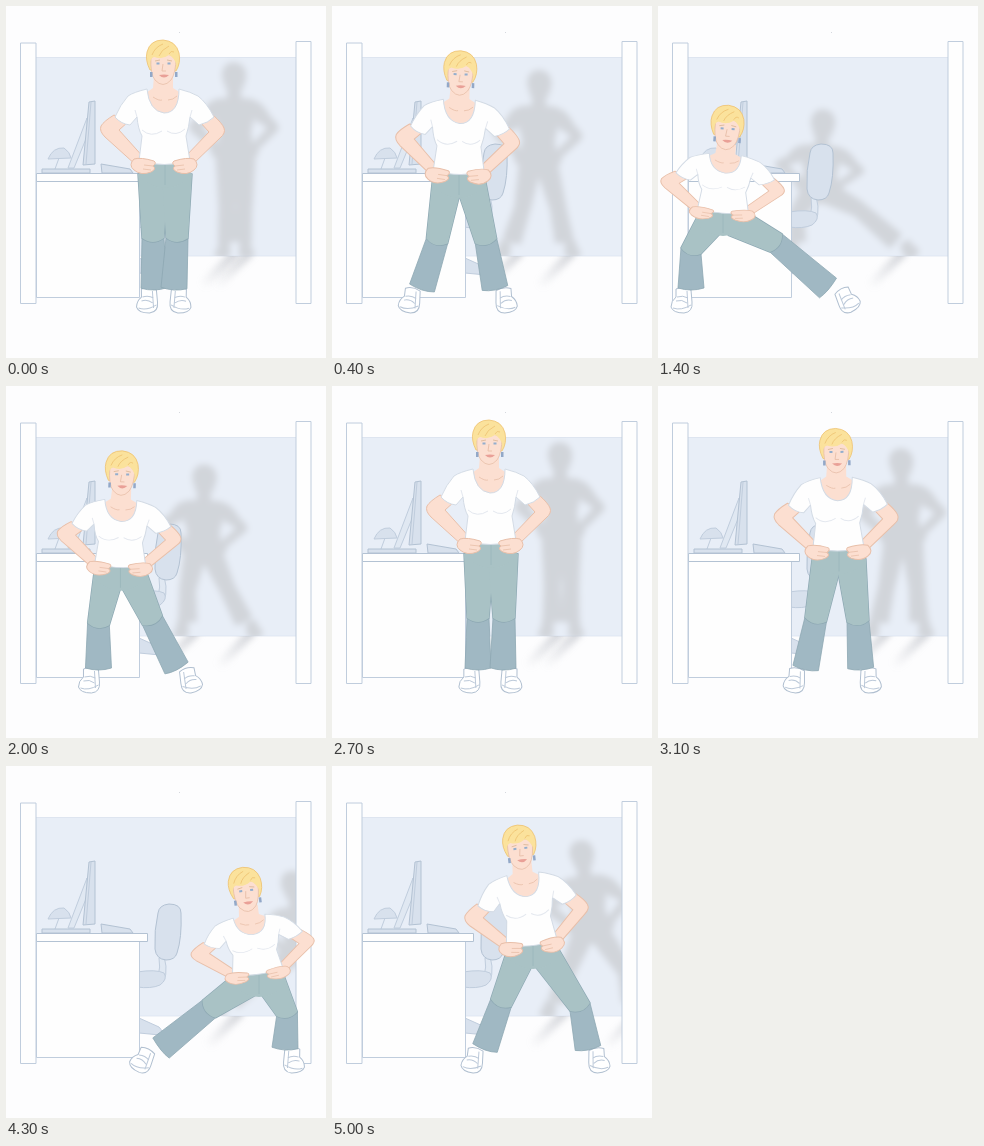
An HTML page with a canvas for the animation above (5100 ms loop, 320 by 352 pixels).

```html
<!DOCTYPE html>
<html lang="en">
<head>
<meta charset="utf-8">
<title>Side lunge exercise</title>
<style>
html, body { margin: 0; width: 100%; height: 100%; overflow: hidden; background: #fdfdfe; }
canvas { display: block; }
</style>
</head>
<body>
<canvas id="stage" width="320" height="352"></canvas>
<script>
const LOOP = 5100, STEP = 100, ANKLE_Y = 282;
const HIP = 15, KNEE = 11, HEM = 13;
const stage = document.getElementById('stage').getContext('2d');
const layer = document.createElement('canvas');
layer.width = 320;
layer.height = 352;
const figure = layer.getContext('2d');

const SKIN = '#fcdfd1', SKIN_LINE = '#e8bfa9', HAIR = '#fbe29c', HAIR_LINE = '#eec271';
const LINE = '#c0cddd', GREY = '#d8e1ed', CLOTH_LINE = '#d3dbe5';
const THIGH = '#a9c2c5', SHIN = '#a0b8c3', PANTS_LINE = '#8da8b3';

// hands x, y, torso tilt, torso height, left knee x, y, left ankle x, right knee x, y, right ankle x
const POSES = {
  together: [159, 162, 0, 1, 147, 232, 148, 171, 232, 168],
  stepLeft: [127, 172, .03, .99, 105, 235, 90, 154, 235, 163],
  wideLeft: [113, 179, .03, .96, 62, 238, 42, 141, 236, 165],
  lungeLeft: [65, 210, .07, .78, 33, 245, 33, 118, 237, 170],
  stand: [159, 162, 0, 1, 146, 232, 146, 172, 232, 171],
  stepRight: [225, 181, -.03, .92, 181, 237, 151, 256, 242, 266],
  lungeRight: [253, 211, -.13, .78, 203, 243, 155, 281, 248, 279],
  returning: [201, 183, -.11, .96, 169, 237, 153, 248, 241, 256]
};
const TIMELINE = [
  [0, 'together'], [400, 'stepLeft'], [600, 'wideLeft'], [1400, 'lungeLeft'], [1500, 'lungeLeft'],
  [2450, 'stand'], [2900, 'stand'], [3500, 'stepRight'], [4200, 'lungeRight'], [4300, 'lungeRight'],
  [5000, 'returning']
];

function poseAt(t) {
  const next = Math.max(1, TIMELINE.findIndex(([time]) => time >= t));
  const [t0, from] = TIMELINE[next - 1], [t1, to] = TIMELINE[next];
  const mix = (t - t0) / (t1 - t0);
  return POSES[from].map((v, i) => v + (POSES[to][i] - v) * mix);
}

function shape(c, d, fill, line, width = 1) {
  const path = new Path2D(d);
  if (fill) { c.fillStyle = fill; c.fill(path); }
  if (line) { c.strokeStyle = line; c.lineWidth = width; c.stroke(path); }
}

function normal([x0, y0], [x1, y1]) {
  const len = Math.hypot(x1 - x0, y1 - y0);
  return [(y0 - y1) / len, (x1 - x0) / len];
}

function legPaths(hip, knee, ankle) {
  const n1 = normal(hip, knee), n2 = normal(knee, ankle);
  const nk = [(n1[0] + n2[0]) / 2, (n1[1] + n2[1]) / 2];
  const at = (p, n, w) => `${p[0] + n[0] * w},${p[1] + n[1] * w}`;
  const bulge = `${knee[0] + nk[1] * 8},${knee[1] - nk[0] * 8}`;
  return {
    thigh: `M${at(hip, n1, HIP)}L${at(knee, nk, KNEE)}Q${bulge} ${at(knee, nk, -KNEE)}L${at(hip, n1, -HIP)}Z`,
    shin: `M${at(knee, nk, KNEE)}L${at(ankle, n2, HEM)}Q${ankle[0]},${ankle[1] + 4} ${at(ankle, n2, -HEM)}L${at(knee, nk, -KNEE)}Z`
  };
}

function drawShoe(c, kneeX, ankleX, offset) {
  const lean = ankleX - kneeX;
  c.save();
  c.translate(ankleX + lean / 5 + offset, 294);
  c.rotate(-lean / 120);
  c.scale(-Math.sign(offset), 1);
  shape(c, 'M-7-11Q0-14 8-10L9 2Q10 12 1 13Q-10 13-12 7Q-12 1-7-3Z', '#fff', '#b0bfd0');
  shape(c, 'M-6-3Q0-5 5-2M-7 1Q-1-1 4 3M-10 8Q-2 11 8 5M4-9L5 8', null, '#bcc9d9');
  c.restore();
}

function drawLegs(c, [x, y, , , lkx, lky, lax, rkx, rky, rax]) {
  const spread = 8 * Math.min(1, (rax - lax) / 28);
  drawShoe(c, lkx, lax, -spread);
  drawShoe(c, rkx, rax, spread);
  const legs = [
    legPaths([x - 12, y + 6], [lkx, lky], [lax, ANKLE_Y]),
    legPaths([x + 12, y + 6], [rkx, rky], [rax, ANKLE_Y])
  ];
  for (const leg of legs) shape(c, leg.shin, SHIN, PANTS_LINE, .8);
  for (const leg of legs) shape(c, leg.thigh, null, PANTS_LINE, 1.4);
  for (const leg of legs) shape(c, leg.thigh, THIGH);
  shape(c, `M${x - 25},${y - 6}Q${x},${y - 11} ${x + 25},${y - 6}L${x + 26},${y + 9}Q${x},${y + 31} ${x - 26},${y + 9}Z`, THIGH);
  shape(c, `M${x},${y - 3}V${y + 17}`, null, '#9bb6bc', .8);
}

function drawTorso(c) {
  shape(c, 'M108 109Q98 115 95 120Q93 125 99 131L130 159L139 153L113 124L122 116Z', SKIN, SKIN_LINE);
  shape(c, 'M207 109Q216 117 218 122Q220 127 214 132L186 159L177 153L203 126L194 116Z', SKIN, SKIN_LINE);
  shape(c, 'M148 70L147 82L137 89Q145 112 158 112Q174 110 178 89L167 82L167 70Z', SKIN);
  shape(c, 'M141 83Q128 86 122 90Q114 99 109 111Q115 118 124 119L131 111Q132 123 136 130L133 155Q158 162 184 155L180 130Q183 121 184 111L193 119Q202 117 208 111Q201 97 192 90Q185 86 173 83Q173 107 158 107Q143 105 141 83Z', '#fefefe', CLOTH_LINE);
  shape(c, 'M136 124Q145 132 156 125M161 125Q170 131 179 123M131 111L129 104M184 111L186 104', null, '#e4e8ef');
  shape(c, 'M147 91Q153 95 156 94M162 94Q167 94 171 90', null, SKIN_LINE, .8);
  shape(c, 'M128 153Q135 151 148 155Q151 157 147 160Q151 163 145 166Q135 170 128 164Q122 159 128 153Z', SKIN, SKIN_LINE);
  shape(c, 'M188 153Q181 151 168 155Q165 157 169 160Q165 163 171 166Q181 170 188 164Q194 159 188 153Z', SKIN, SKIN_LINE);
  shape(c, 'M147 160L138 159M145 164L137 163M169 160L178 159M171 164L179 163', null, SKIN_LINE, .8);
}

function drawHead(c) {
  shape(c, 'M144 64Q139 54 141 46Q144 34 157 34Q170 35 173 47Q175 57 170 65Z', HAIR, HAIR_LINE, .8);
  shape(c, 'M145 51Q144 68 149 74Q157 83 165 74Q170 67 170 51Q158 45 145 51Z', SKIN, SKIN_LINE, .8);
  shape(c, 'M143 60Q144 52 148 51Q156 54 163 49Q168 51 171 60Q174 46 166 40Q157 34 147 41Q140 47 143 60Z', HAIR);
  shape(c, 'M146 49Q149 41 157 38M153 50Q155 44 163 40M163 48Q165 44 168 46', null, HAIR_LINE, .8);
  shape(c, 'M149 55L154 54M161 54L166 55', null, '#d9b594', .8);
  shape(c, 'M150.5 56.5H153.5V58.5H150.5ZM161.5 56.5H164.5V58.5H161.5Z', '#93aecd');
  shape(c, 'M157 58L156 65H160', null, SKIN_LINE, .9);
  shape(c, 'M153 69Q158 68 163 69Q158 74 153 69Z', '#e9a097');
  shape(c, 'M144 66h2.5v5h-2.5ZM169 66h2.5v5h-2.5Z', '#92a8c8');
}

function drawFigure(c, pose) {
  const [x, y, tilt, height] = pose;
  c.lineJoin = 'round';
  c.clearRect(0, 0, 320, 352);
  drawLegs(c, pose);
  c.save();
  c.translate(x, y);
  c.rotate(tilt);
  c.scale(1, height);
  c.translate(-159, -162);
  drawTorso(c);
  c.translate(0, 84);
  c.scale(1, 1 / height);
  c.translate(0, -84);
  drawHead(c);
  c.restore();
}

function drawShadow(c, lax, rax) {
  c.save();
  c.beginPath();
  c.rect(30, 51, 260, 199);
  c.clip();
  c.setTransform(.72, 0, 0, .72, 115, 32);
  c.globalAlpha = .42;
  c.filter = 'blur(3px) brightness(0) invert(.7)';
  c.drawImage(layer, 0, 0);
  c.restore();

  c.save();
  c.beginPath();
  c.rect(133, 250, 157, 60);
  c.clip();
  c.filter = 'blur(3px)';
  for (const ankle of [lax, rax]) {
    const x = ankle * .72 + 121;
    const fade = c.createLinearGradient(x, 248, x - 32, 281);
    fade.addColorStop(0, 'rgba(150,155,165,.4)');
    fade.addColorStop(1, 'rgba(150,155,165,0)');
    shape(c, `M${x + 3},245L${x - 32},281`, null, fade, 9);
  }
  c.restore();
}

function drawOffice(c) {
  // chair
  shape(c, 'M133 252L153 261Q158 266 154 269L133 267Z', GREY, LINE);
  shape(c, 'M158 190Q164 212 153 219L145 216Q156 212 153 192Z', '#e0e8f2', LINE);
  shape(c, 'M131 206Q150 203 158 207Q162 213 154 219Q145 223 131 221Z', GREY, LINE);
  shape(c, 'M152 147Q153 139 163 138Q175 138 175 147Q176 172 171 187Q169 194 160 194Q150 193 149 183Q148 164 152 147Z', GREY, '#b3c2d3');
  // desk and things on it
  shape(c, 'M30.5 175H133.5V291.5H30.5Z', '#fefefe', LINE);
  shape(c, 'M30.5 167.5H141.5V175.5H30.5Z', '#fefefe', '#b3c2d3');
  shape(c, 'M81 112L62 162H68L82 128Z', '#e0e8f2', LINE);
  shape(c, 'M83 96L89 95V158L77 159Z', GREY, '#b3c2d3');
  shape(c, 'M85 96L80 158', null, LINE);
  shape(c, 'M42 153Q47 141 58 142Q64 146 65 152ZM53 152L49 163', GREY, LINE);
  shape(c, 'M36 163H84V167H36ZM95 158L124 163L127 167H96Z', GREY, '#b3c2d3');
  // posts
  shape(c, 'M14.5 37H30V297.5H14.5ZM290 35.5H305V297.5H290Z', '#fefefe', LINE);
}

function render(t) {
  const pose = poseAt(t);
  drawFigure(figure, pose);
  stage.fillStyle = '#fdfdfe';
  stage.fillRect(0, 0, 320, 352);
  shape(stage, 'M30 51H290V250H30Z', '#e8eef7');
  shape(stage, 'M30 51.5H290M30 250H290', null, '#dce4ef', .8);
  shape(stage, 'M173 26h1v1h-1Z', '#d5d8de');
  drawShadow(stage, pose[6], pose[9]);
  drawOffice(stage);
  stage.drawImage(layer, 0, 0);
}

function tick() {
  render(Math.floor(performance.now() % LOOP / STEP) * STEP);
  requestAnimationFrame(tick);
}
tick();
</script>
</body>
</html>
```
